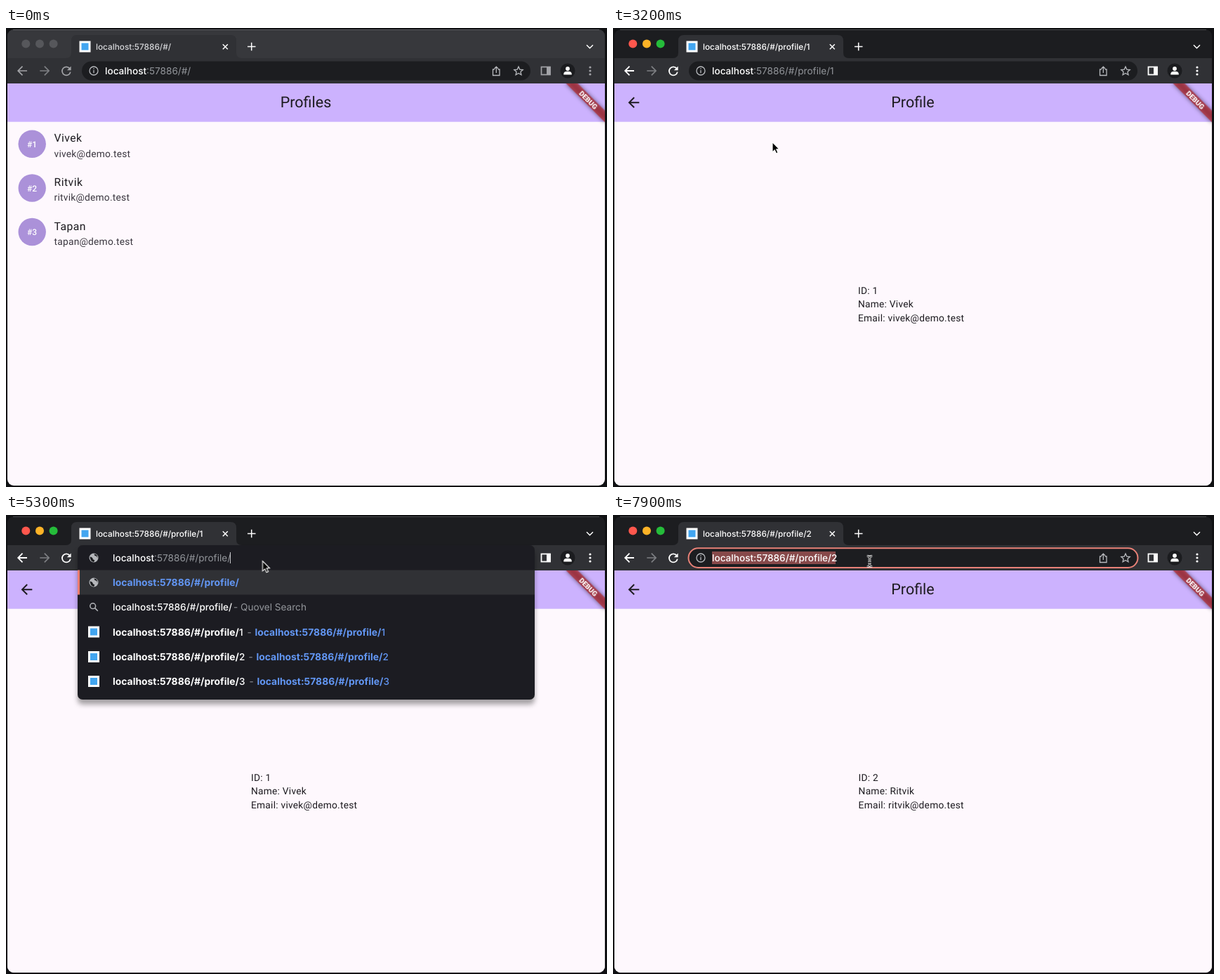
These frames come from a looping animation (856 by 654 pixels, 8000 ms). An HTML page:

```html
<!DOCTYPE html>
<html lang="en">
<head>
<meta charset="utf-8">
<title>Profiles</title>
<style>
  html, body { margin: 0; width: 100%; height: 100%; overflow: hidden; background: #101113; }
  svg { display: block; }
  text { white-space: pre; text-rendering: geometricPrecision; }

  .ui { font-family: Inter, "Open Sans", sans-serif; font-weight: 500; fill: #fff; }
  .tab-title { font-size: 11.8px; }
  .url { font-size: 13.6px; }
  .dim { fill: #93969b; font-weight: 400; }
  .blue { fill: #6296f3; }
  .bold { font-weight: 700; font-size: 13.9px; }

  .app { font-family: Roboto, "Noto Sans", sans-serif; fill: #1d1b20; }
  .heading { font-size: 21.56px; text-anchor: middle; }
  .name { font-size: 15.7px; letter-spacing: .49px; }
  .body { font-size: 13.75px; letter-spacing: .245px; }
  .mail { fill: #3a363f; }
  .badge { font-size: 12px; font-weight: 500; fill: #fff; text-anchor: middle; }
  .debug { font-size: 10px; font-weight: 900; fill: #fff; text-anchor: middle; }

  .line { fill: none; stroke: #fff; stroke-width: 1.5; }
  .thin { fill: none; stroke: #b9bbbf; stroke-width: 1.3; }
  .grey { fill: none; stroke: #7d7f83; stroke-width: 1.7; }

  /* Hard switches; 1.25% of the loop is 100 ms */
  .idle, .awake, .home, .one, .two, .card1, .card2, .focus, .picked,
  .menu1, .menu2, .click, .arrow, .beam { animation: 8s step-end infinite; }
  .idle   { animation-name: idle; }
  .awake  { animation-name: awake; }
  .home   { animation-name: home; }
  .one    { animation-name: one; }
  .two    { animation-name: two; }
  .card1  { animation-name: card1; }
  .card2  { animation-name: card2; }
  .focus  { animation-name: focus; }
  .picked { animation-name: picked; }
  .menu1  { animation-name: menu1; }
  .menu2  { animation-name: menu2; }
  .click  { animation-name: click; }
  .arrow  { animation-name: arrow; }
  .beam   { animation-name: beam; }
  @keyframes idle   { 0% { opacity: 1 } 25%, to { opacity: 0 } }
  @keyframes awake  { 0% { opacity: 0 } 25%, to { opacity: 1 } }
  @keyframes home   { 0% { opacity: 1 } 35%, to { opacity: 0 } }
  @keyframes one    { 0% { opacity: 0 } 35% { opacity: 1 } 78.7%, to { opacity: 0 } }
  @keyframes two    { 0% { opacity: 0 } 78.7%, to { opacity: 1 } }
  @keyframes card1  { 0% { opacity: 1 } 81.25%, to { opacity: 0 } }
  @keyframes card2  { 0% { opacity: 0 } 81.25%, to { opacity: 1 } }
  @keyframes focus  { 0% { opacity: 0 } 52.5% { opacity: 1 } 65% { opacity: 0 } 96.2%, to { opacity: 1 } }
  @keyframes picked { 0% { opacity: 0 } 52.5% { opacity: 1 } 57.5% { opacity: 0 } 97.5%, to { opacity: 1 } }
  @keyframes menu1  { 0% { opacity: 0 } 65% { opacity: 1 } 70%, to { opacity: 0 } }
  @keyframes menu2  {
    0% { opacity: 0 } 70% { opacity: 1 } 78.7% { opacity: .35 }
    79.8% { opacity: .03 } 81.25%, to { opacity: 0 }
  }
  @keyframes click {
    0% { opacity: 0 } 23.6% { opacity: 1 } 25% { opacity: 0 } 32.5% { opacity: 1 } 33.75% { opacity: 0 }
    52.5% { opacity: 1 } 53.75% { opacity: 0 } 57.5% { opacity: 1 } 58.75% { opacity: 0 }
    96.2% { opacity: 1 } 97.5%, to { opacity: 0 }
  }
  @keyframes arrow { 0% { opacity: 0 } 5% { opacity: 1 } 47.5% { opacity: 0 } 65% { opacity: 1 } 78.7%, to { opacity: 0 } }
  @keyframes beam  { 0% { opacity: 0 } 47.5% { opacity: 1 } 65% { opacity: 0 } 78.7%, to { opacity: 1 } }

  /* Motion */
  .list    { animation: leave 8s cubic-bezier(.35, .91, .33, .97) infinite; }
  .profile { animation: enter 8s cubic-bezier(.35, .91, .33, .97) infinite; }
  .pointer { animation: roam 8s ease-in-out infinite; }
  @keyframes leave { 0%, 35% { transform: none } 39.4%, to { transform: translateX(-284px) } }
  @keyframes enter { 0%, 35% { transform: translateX(852px) } 39.4%, to { transform: none } }
  @keyframes roam {
    0%, 5% { transform: translate(360px, 505px) }
    13.75%, 26.25% { transform: translate(230px, 167px) }
    28%, 40.6% { transform: translate(227px, 163px) }
    45% { transform: translate(338px, 90px) }
    50%, to { transform: translate(365.5px, 66px) }
  }
</style>
</head>
<body>
<svg width="856" height="654" viewBox="0 0 856 654">
  <defs>
    <clipPath id="win"><rect x="2" y="2" width="851" height="650" rx="9"/></clipPath>
    <clipPath id="view"><rect x="2" y="79" width="851" height="573"/></clipPath>
    <filter id="soft" x="-30%" y="-150%" width="160%" height="400%"><feGaussianBlur stdDeviation="3"/></filter>
    <filter id="drop" x="-5%" y="-10%" width="110%" height="130%">
      <feDropShadow dx="0" dy="7" stdDeviation="3.5" flood-color="#000" flood-opacity=".35"/>
    </filter>
    <g id="icon">
      <rect x="-8" y="-8" width="16" height="16" fill="#fff"/>
      <rect x="-5" y="-5" width="10" height="10" fill="#42a5f0"/>
    </g>
    <g id="globe">
      <circle r="6.5" fill="#b4b6ba"/>
      <path d="M-5.5-1.5Q-2-1-1.5 1T.5 3 0 6Q-5 5-5.5-1.5ZM.5-5.5Q1-2.5 3-2.5T5 1Q6-3 3-5Z" fill="#1c1d20"/>
    </g>
    <g id="lens" fill="none" stroke="#b4b6ba" stroke-width="1.5">
      <circle cx="-1.3" cy="-1.3" r="3.9"/><path d="M1.6 1.6 5.8 5.8"/>
    </g>
    <path id="back" d="M6.5 0H-6M0-6.3-6.3 0 0 6.3"/>
    <path id="reload" d="M4.7-3.3A6 6 0 1 0 5.8 1.6"/>
    <path id="tip" d="M6.6-6.5V-.8H.9Z"/>
    <g id="dots"><circle cy="-5" r="1.6"/><circle r="1.6"/><circle cy="5" r="1.6"/></g>
    <path id="bar" d="M-3.5-7.5Q0-7.5 0-5 0-7.5 3.5-7.5M-3.5 7.5Q0 7.5 0 5 0 7.5 3.5 7.5M0-5V5M-2 1.5H2"/>
  </defs>

  <g clip-path="url(#win)">
    <!-- Tab strip -->
    <rect width="856" height="80" fill="#1c1d20"/>
    <rect class="idle" width="856" height="80" fill="#37383c"/>
    <path d="M0 43H85Q93 43 93 35V18Q93 10 101 10H320Q328 10 328 18V35Q328 43 336 43H856V79H0Z" fill="#303135"/>
    <g class="idle" fill="#56575b">
      <circle cx="28.3" cy="22.5" r="6"/><circle cx="48" cy="22.5" r="6"/><circle cx="67.6" cy="22.5" r="6"/>
    </g>
    <g class="awake">
      <circle cx="28.3" cy="22.5" r="6" fill="#ff574d"/>
      <circle cx="48" cy="22.5" r="6" fill="#fdb327"/>
      <circle cx="67.6" cy="22.5" r="6" fill="#25bc3a"/>
    </g>
    <use href="#icon" x="112.5" y="26.5"/>
    <g class="ui tab-title">
      <text class="home" x="128" y="31" fill="#d6d7da">localhost:57886/#/</text>
      <text class="one" x="128" y="31">localhost:57886/#/profile/1</text>
      <text class="two" x="128" y="31">localhost:57886/#/profile/2</text>
    </g>
    <path class="line" d="M308.8 23.3l7 7m0-7-7 7M344 26.5h11.500M349.700 20.800v11.500M827 24.300l4.500 4.500 4.500-4.500"/>

    <!-- Toolbar -->
    <g class="idle">
      <g fill="none" stroke="#a2a3a7" stroke-width="1.7">
        <use href="#back" x="23.5" y="61"/>
        <use href="#reload" x="86" y="61"/>
        <rect x="762.5" y="55.5" width="12.500" height="11"/>
      </g>
      <g fill="#a2a3a7">
        <use href="#tip" x="86" y="61"/>
        <path d="M770 55h5.500v12H770Z"/>
        <use href="#dots" x="832" y="61"/>
      </g>
    </g>
    <g class="awake">
      <g fill="none" stroke="#fff" stroke-width="1.8">
        <use href="#back" x="23.5" y="61"/>
        <use href="#reload" x="86" y="61"/>
        <rect x="762.5" y="55.5" width="12.500" height="11"/>
      </g>
      <g fill="#fff">
        <use href="#tip" x="86" y="61"/>
        <path d="M770 55h5.500v12H770Z"/>
        <use href="#dots" x="832" y="61"/>
      </g>
    </g>
    <use href="#back" class="grey" transform="translate(54.8 61) scale(-1 1)"/>
    <circle cx="800" cy="61" r="10.5" fill="#1b1c1f"/>
    <circle cx="800" cy="58" r="2.9" fill="#fff"/>
    <path d="M794.3 66.5v-1.300q0-3.400 5.700-3.400t5.700 3.400v1.300Z" fill="#fff"/>

    <!-- Address field -->
    <rect x="108" y="47.5" width="639" height="27" rx="13.5" fill="#1c1d20"/>
    <rect class="focus" x="107.5" y="47.3" width="640" height="27.6" rx="13.8" fill="none" stroke="#e88177" stroke-width="2"/>
    <circle class="thin" cx="125" cy="61" r="6"/>
    <path class="thin" d="M125 60v4.300M125 57.200v1.500"/>
    <path class="thin" d="M695.8 59h-2.300v8.500h9.500V59h-2.300M698.3 64v-8.500M695.5 58l2.800-2.800 2.800 2.800"/>
    <path class="thin" d="M730 55l1.800 4.100 4.400.4-3.300 2.900 1 4.300-3.900-2.300-3.900 2.300 1-4.300-3.300-2.900 4.400-.4Z"/>
    <g class="ui url">
      <text class="home" x="141" y="66">localhost<tspan class="dim">:57886/#/</tspan></text>
      <text class="one" x="141" y="66">localhost<tspan class="dim">:57886/#/profile/1</tspan></text>
      <text class="two" x="141" y="66">localhost<tspan class="dim">:57886/#/profile/2</tspan></text>
      <g class="picked">
        <rect x="141" y="52" width="176" height="18" fill="#87494a"/>
        <text class="one" x="141" y="66">localhost:57886/#/profile/1</text>
        <text class="two" x="141" y="66">localhost:57886/#/profile/2</text>
      </g>
    </g>

    <!-- Page -->
    <g class="app" clip-path="url(#view)">
      <rect y="79" width="856" height="580" fill="#fef8fd"/>
      <g class="list">
        <rect x="2" y="79" width="852" height="54.7" fill="#ccb2fe"/>
        <text class="heading" x="427" y="113">Profiles</text>
        <g fill="#ab91d9">
          <circle cx="37.2" cy="165.2" r="19.7"/><circle cx="37.2" cy="228" r="19.7"/><circle cx="37.2" cy="290.5" r="19.7"/>
        </g>
        <text class="badge" x="37" y="169.7">#1</text>
        <text class="badge" x="37" y="232.5">#2</text>
        <text class="badge" x="37" y="295">#3</text>
        <text class="name" x="68.5" y="162">Vivek</text>
        <text class="body mail" x="68.5" y="183.5">vivek@demo.test</text>
        <text class="name" x="68.5" y="224.7">Ritvik</text>
        <text class="body mail" x="68.5" y="246.2">ritvik@demo.test</text>
        <text class="name" x="68.5" y="287.5">Tapan</text>
        <text class="body mail" x="68.5" y="309">tapan@demo.test</text>
      </g>
      <g class="profile">
        <rect x="2" y="79" width="856" height="580" fill="#fef8fd"/>
        <rect x="2" y="79" width="852" height="54.7" fill="#ccb2fe"/>
        <path transform="translate(17.7 94.4) scale(.98)" d="M20 11H7.830l5.590-5.590L12 4l-8 8 8 8 1.410-1.410L7.830 13H20Z"/>
        <text class="heading" x="427" y="113">Profile</text>
        <g class="body card1">
          <text x="349" y="378.5">ID: 1</text>
          <text x="349" y="398.2">Name: Vivek</text>
          <text x="349" y="417.9">Email: vivek@demo.test</text>
        </g>
        <g class="body card2">
          <text x="349.6" y="378.5">ID: 2</text>
          <text x="349.6" y="398.2">Name: Ritvik</text>
          <text x="349.6" y="417.9">Email: ritvik@demo.test</text>
        </g>
      </g>
      <g transform="translate(853 79) rotate(45)">
        <rect x="-39.2" y="27.4" width="78.4" height="11.8" opacity=".5" fill="#000" filter="url(#soft)"/>
        <rect x="-39.2" y="27.4" width="78.4" height="11.8" fill="#b71c1c" fill-opacity=".63"/>
        <text class="debug" y="36.9">DEBUG</text>
      </g>
    </g>

    <!-- Suggestions -->
    <g class="menu1 ui url">
      <rect x="102" y="43" width="651" height="220" rx="7" fill="#1c1d20" filter="url(#drop)"/>
      <rect x="102" y="78.5" width="651" height="35" fill="#303135"/>
      <rect x="102" y="78.5" width="3" height="35" fill="#ee7c70"/>
      <use href="#globe" x="125" y="61"/><use href="#globe" x="125" y="96"/><use href="#lens" x="125" y="131"/>
      <use href="#icon" x="125" y="166.5"/><use href="#icon" x="125" y="202"/><use href="#icon" x="125" y="237"/>
      <text x="152" y="66">localhost<tspan class="dim">:57886/#/profile/</tspan></text>
      <path d="M319.5 53v16" stroke="#c8c9cc"/>
      <text class="blue bold" x="152" y="101">localhost:57886/#/profile/</text>
      <text x="152" y="136">localhost:57886/#/profile/<tspan class="dim" x="324">- Quovel Search</tspan></text>
      <text x="152" y="171.5"><tspan class="bold">localhost:57886/#/profile/</tspan>1<tspan class="dim" x="343.5">-</tspan><tspan class="blue bold" x="354.5">localhost:57886/#/profile/</tspan><tspan class="blue">1</tspan></text>
      <text x="152" y="207"><tspan class="bold">localhost:57886/#/profile/</tspan>2<tspan class="dim" x="345.5">-</tspan><tspan class="blue bold" x="356.5">localhost:57886/#/profile/</tspan><tspan class="blue">2</tspan></text>
      <text x="152" y="242"><tspan class="bold">localhost:57886/#/profile/</tspan>3<tspan class="dim" x="346.5">-</tspan><tspan class="blue bold" x="357.5">localhost:57886/#/profile/</tspan><tspan class="blue">3</tspan></text>
    </g>
    <g class="menu2 ui url">
      <rect x="102" y="43" width="651" height="114" rx="7" fill="#1c1d20" filter="url(#drop)"/>
      <rect x="102" y="78.5" width="651" height="35" fill="#303135"/>
      <rect x="102" y="78.5" width="3" height="35" fill="#ee7c70"/>
      <use href="#icon" x="125" y="61"/><use href="#icon" x="125" y="96"/><use href="#lens" x="125" y="131"/>
      <text x="152" y="66">localhost<tspan class="dim">:57886/#/profile/2</tspan></text>
      <path d="M328.5 53v16" stroke="#c8c9cc"/>
      <text x="152" y="101"><tspan class="bold">localhost:57886/#/profile/2</tspan><tspan class="dim" x="347">-</tspan><tspan class="blue bold" x="358">localhost:57886/#/profile/2</tspan></text>
      <text x="152" y="136">localhost:57886/#/profile/2<tspan class="dim" x="333">- Quovel Search</tspan></text>
    </g>
  </g>
  <path d="M10 2.5H845" stroke="#fff" stroke-opacity=".2"/>

  <!-- Pointer -->
  <g class="pointer">
    <circle class="click" r="19.5" fill="none" stroke="#000" stroke-width="3"/>
    <path class="arrow" d="M0-.5V13.8L3.3 10.8 5.5 15.8 8 14.7 5.8 9.8H10Z" fill="#000" stroke="#fff" stroke-width="1.1"/>
    <g class="beam" fill="none">
      <use href="#bar" stroke="#fff" stroke-width="3"/>
      <use href="#bar" stroke="#000"/>
    </g>
  </g>
</svg>
</body>
</html>
```
